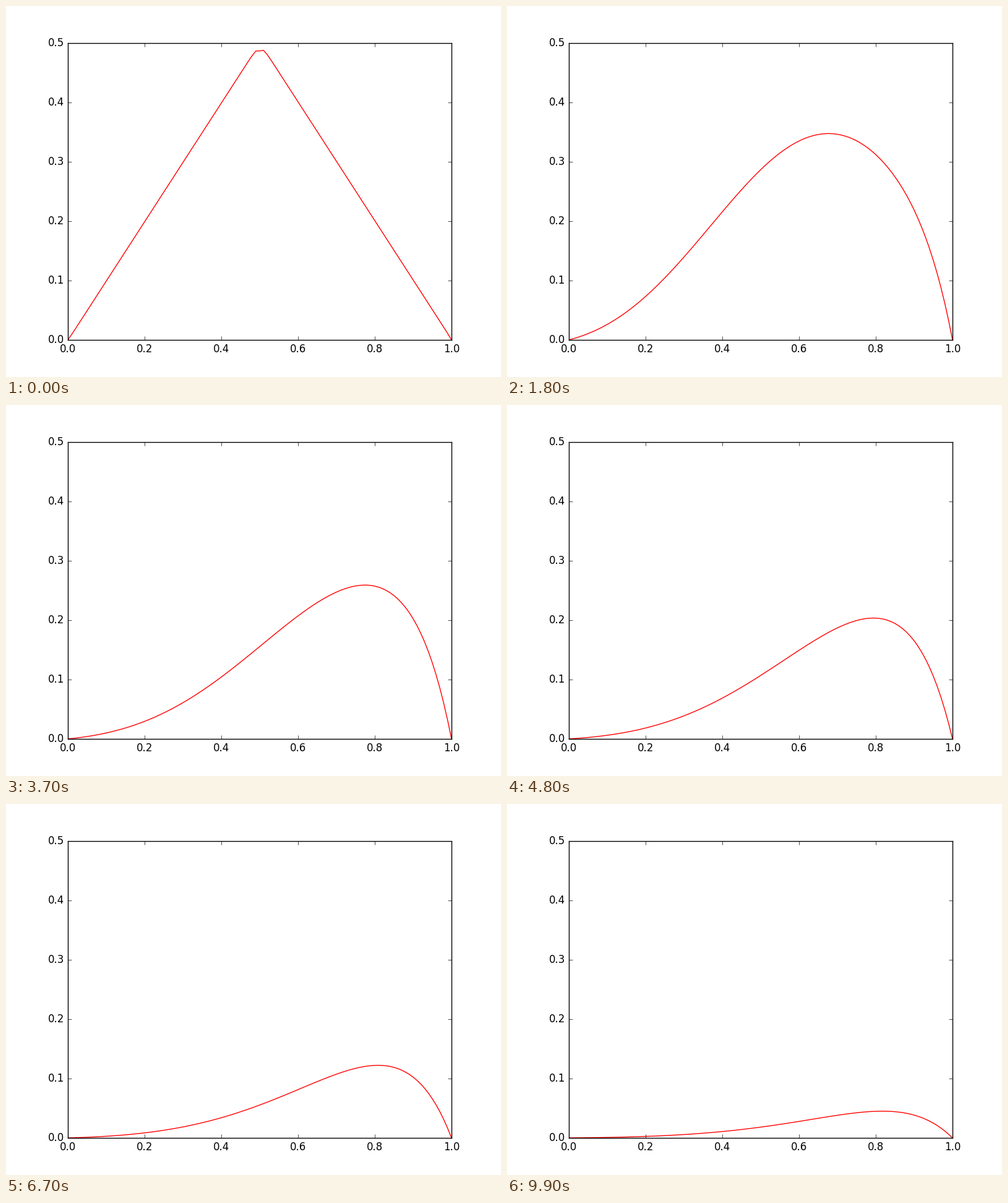
A matplotlib script that plays this animation: 800x600 px, repeating every 10 s.

```python
import numpy as np
import matplotlib.pyplot as plt
from matplotlib.animation import FuncAnimation

# Advection-diffusion u_t + A u_x = NU u_xx on [0, 1] with u = 0 at both ends,
# solved with linear finite elements in space and Crank-Nicolson in time.
CELLS = 100
A, NU = 1.0, 0.1
DT = 0.001
STEPS_PER_FRAME = 10
FRAMES = 100
INTERVAL = 100


def tridiag(low, mid, high, n):
    return low * np.eye(n, k=-1) + mid * np.eye(n) + high * np.eye(n, k=1)


def solve():
    h = 1 / CELLS
    n = CELLS - 1
    mass = h * tridiag(1 / 6, 4 / 6, 1 / 6, n)
    stiff = NU / h * tridiag(-1, 2, -1, n) + A * tridiag(-0.5, 0, 0.5, n)
    half = DT / 2 * stiff
    step = np.linalg.solve(mass + half, mass - half)
    jump = np.linalg.matrix_power(step, STEPS_PER_FRAME)

    x = np.linspace(0, 1, CELLS + 1)
    u = step @ np.minimum(x, 1 - x)[1:-1]
    curves = np.zeros((FRAMES, CELLS + 1))
    for curve in curves:
        curve[1:-1] = u
        u = jump @ u
    return x, curves


x, curves = solve()

plt.style.use("classic")
plt.rcParams["font.family"] = "DejaVu Sans"
fig, ax = plt.subplots(figsize=(8, 6), dpi=100, facecolor="white")
ax.set_xlim(0, 1)
ax.set_ylim(0, 0.5)
ax.set_xticks(np.linspace(0, 1, 6))
ax.set_yticks(np.linspace(0, 0.5, 6))
line, = ax.plot(x, curves[0], color="red", lw=1)


def update(frame):
    line.set_ydata(curves[frame])
    return line,


anim = FuncAnimation(fig, update, frames=FRAMES, interval=INTERVAL,
                     repeat=True, repeat_delay=0)
plt.show()
```
